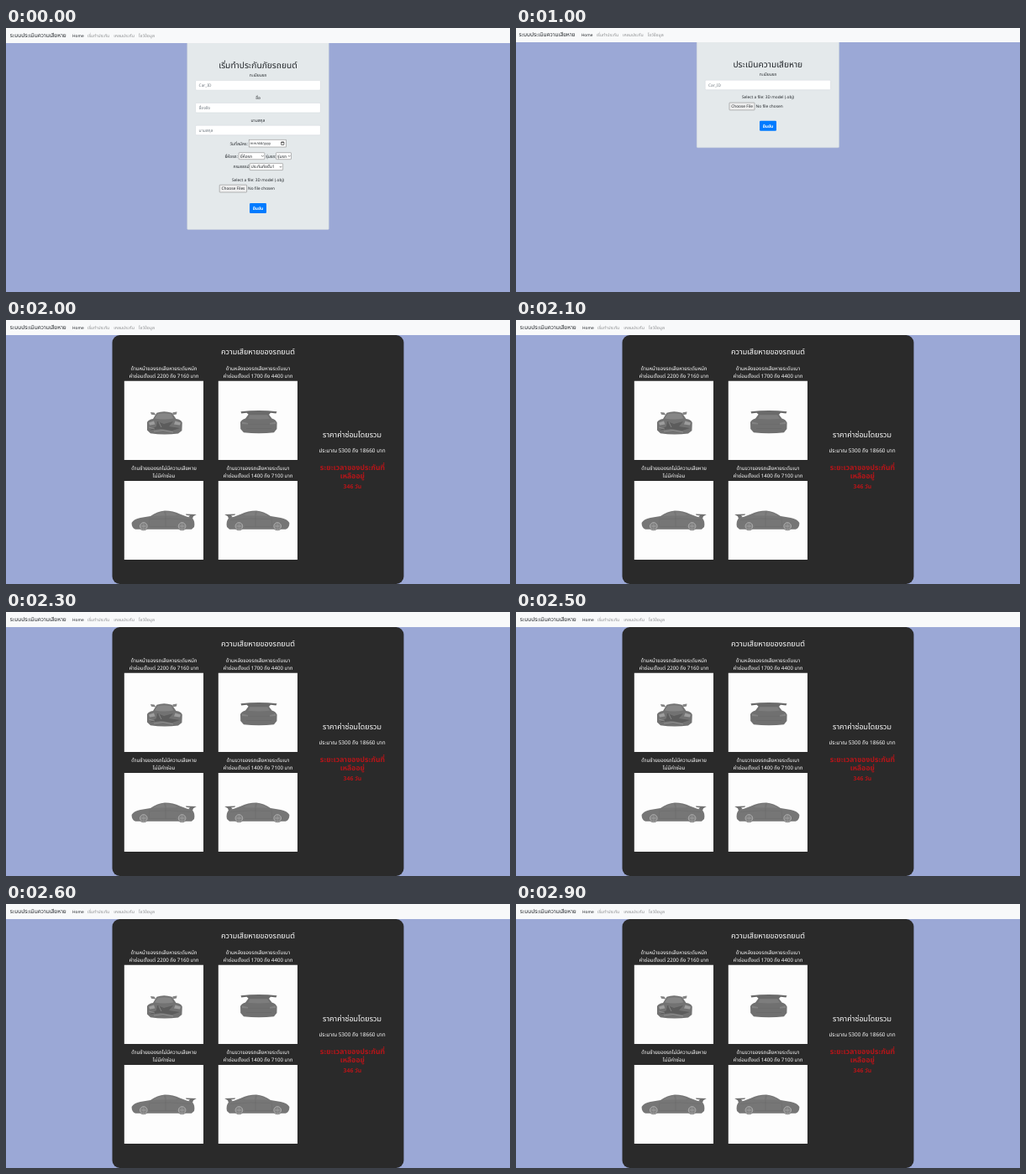
Recreate the animation shown at these times as an HTML page. Size 600 by 315 pixels, loop 3 s.

```html
<!DOCTYPE html>
<html lang="th">
<head>
<meta charset="utf-8">
<title>ระบบประเมินความเสียหาย</title>
<style>
html, body { margin: 0; width: 100%; height: 100%; overflow: hidden; background: #9ba8d6; }
svg { display: block; width: 600px; height: 315px; }
text { font: 5px "Noto Sans", "Noto Sans Thai", sans-serif; fill: #212529; text-rendering: geometricPrecision; }
.page { animation: turn 3s step-end infinite; }
.second { animation-delay: -2s; }
.third { animation-delay: -1s; }
@keyframes turn {
  0% { visibility: visible; }
  33.3333%, 100% { visibility: hidden; }
}
.mid text, text.mid { text-anchor: middle; }
.en { font-size: 4.8px; }
.brand { font-size: 6.6px; }
.faint { font-size: 5.2px; fill: #8d8f91; }
.hint { fill: #6c757d; }
.date { font-size: 4.2px; }
.h1 { font-size: 10.2px; font-weight: 500; }
.card { fill: #e4e9eb; stroke: #cdd3da; stroke-width: .4; }
.field { fill: #fff; stroke: #ced4da; stroke-width: .5; }
.box { fill: #fff; stroke: #767676; stroke-width: .5; }
.file { fill: #efefef; stroke: #767676; stroke-width: .5; }
.blue { fill: #007bff; }
.send { fill: #fff; font-weight: 600; }
.third .mid text { fill: #fff; font-size: 6.15px; font-weight: 500; }
.third .mid .h2 { font-size: 9px; font-weight: 400; }
.third .mid .total { font-size: 6.45px; }
.third .mid .red { fill: #b51519; font-size: 8.7px; font-weight: 600; }
.third .mid .days { font-size: 6.9px; }
</style>
</head>
<body>
<svg viewBox="0 0 600 315">
  <defs>
    <g id="nav">
      <rect x="-4" y="-2" width="610" height="20" fill="#f8f9fa"/>
      <text class="brand" x="4.8" y="11.4">ระบบประเมินความเสียหาย</text>
      <text class="en" x="79" y="11">Home</text>
      <text class="faint" x="97.1" y="11">เริ่มทำประกัน</text>
      <text class="faint" x="128.3" y="11">เคลมประกัน</text>
      <text class="faint" x="158" y="11">โชว์ข้อมูล</text>
    </g>
    <path id="arrow" d="M-1.2-.6 0 .6 1.2-.6" fill="none" stroke="#222" stroke-width=".6"/>
    <g id="send">
      <rect class="blue" x="290" width="20" height="12" rx="1.3"/>
      <text class="send mid" x="300" y="7.8">ยืนยัน</text>
    </g>
    <g id="wheel">
      <circle r="5.2" fill="#6c6c6c"/>
      <circle r="4.4" fill="#818181" stroke="#cfcfcf" stroke-width=".6"/>
      <path d="M0-4V4M-3.8-1.2 3.8 1.2M-3.8 1.2 3.8-1.2" stroke="#aaa" stroke-width=".4"/>
    </g>
    <g id="side">
      <path d="M149.6 242Q152 237.6 160 236L172 234Q180 228.4 189 227.5Q199 227.6 207 231.5L215 234.6 222 236.5Q225.5 241 224 247L221 249.8H154Q149.5 248 149.6 242Z" fill="#767676"/>
      <path d="M214 231.4 226.8 232 223 234.2 222 237 217 235.2 219 233.4 214.5 232.8Z" fill="#707070"/>
      <path d="M175 233.8Q181 229.6 188 228.8L189 233.6ZM190.5 228.8Q198 229 204 232.7L201 233.5 191 233.6Z" fill="#7f7f7f"/>
      <path d="M171 235.5 170 246.5H203M190 234V247M172 237.5Q195 236 220 238.5" fill="none" stroke="#696969" stroke-width=".4"/>
      <use href="#wheel" x="163.8" y="246"/>
      <use href="#wheel" x="209.6" y="246"/>
    </g>
  </defs>

  <g class="page">
    <rect width="600" height="315" fill="#9ba8d6"/>
    <rect class="card" x="215.7" y="16" width="168.6" height="224.5" rx="1.3"/>
    <use href="#nav"/>
    <g class="mid">
      <text class="h1" x="300" y="48.2">เริ่มทำประกันภัยรถยนต์</text>
      <text x="300" y="57.8">ทะเบียนรถ</text>
      <text x="300" y="85">ชื่อ</text>
      <text x="300" y="111.8">นามสกุล</text>
      <text class="en" x="300" y="182.6">Select a file: 3D model (.obj)</text>
    </g>
    <rect class="field" x="225.6" y="62.6" width="148.8" height="11.6" rx="1.2"/>
    <rect class="field" x="225.6" y="89.4" width="148.8" height="11.6" rx="1.2"/>
    <rect class="field" x="225.6" y="116.2" width="148.8" height="11.6" rx="1.2"/>
    <text class="hint en" x="229.6" y="70.2">Car_ID</text>
    <text class="hint" x="229.6" y="97">ชื่อจริง</text>
    <text class="hint" x="229.6" y="123.8">นามสกุล</text>

    <text x="266.4" y="139.5">วันที่สมัคร:</text>
    <rect class="box" x="289.2" y="133.2" width="44.4" height="8.8"/>
    <text class="date" x="290.6" y="139.2">mm/dd/yyyy</text>
    <path d="M327.7 136h3.2v3.3h-3.2zM327.7 136.4h3.2" fill="none" stroke="#111" stroke-width=".6"/>

    <text x="260.4" y="154.6">ยี่ห้อรถ:</text>
    <rect class="box" x="277.2" y="148.7" width="30.6" height="8" rx=".6"/>
    <text x="278.8" y="154.5">ยี่ห้อรถ</text>
    <use href="#arrow" x="305.4" y="152.8"/>
    <text x="309.2" y="154.6">รุ่นรถ:</text>
    <rect class="box" x="321.5" y="148.7" width="18" height="8" rx=".6"/>
    <text x="323" y="154.5">รุ่นรถ</text>
    <use href="#arrow" x="337.2" y="152.8"/>

    <text x="270.4" y="167.4">กรมธรรม์</text>
    <rect class="box" x="290.2" y="161.6" width="39.4" height="8" rx=".6"/>
    <text x="291.8" y="167.3">ประกันภัยชั้น1</text>
    <use href="#arrow" x="327" y="165.7"/>

    <rect class="file" x="254.2" y="187.2" width="32.4" height="8.8" rx=".6"/>
    <text class="en" x="256.4" y="193.4">Choose Files</text>
    <text class="en" x="288" y="193.4">No file chosen</text>
    <use href="#send" y="209"/>
  </g>

  <g class="page second">
    <rect width="600" height="315" fill="#9ba8d6"/>
    <rect class="card" x="215.2" y="15" width="169.4" height="127.8" rx="1.3"/>
    <use href="#nav" x="-1.2" y="-1"/>
    <g class="mid">
      <text class="h1" x="299.8" y="47.2">ประเมินความเสียหาย</text>
      <text x="300" y="57.4">ทะเบียนรถ</text>
      <text class="en" x="300" y="84.2">Select a file: 3D model (.obj)</text>
    </g>
    <rect class="field" x="225.2" y="62.2" width="149.4" height="11.6" rx="1.2"/>
    <text class="hint en" x="229" y="69.8">Car_ID</text>
    <rect class="file" x="254" y="89.1" width="30" height="8.8" rx=".6"/>
    <text class="en" x="256.2" y="95.3">Choose File</text>
    <text class="en" x="285.6" y="95.3">No file chosen</text>
    <use href="#send" y="110.8"/>
  </g>

  <g class="page third">
    <rect width="600" height="315" fill="#9ba8d6"/>
    <use href="#nav"/>
    <rect x="126.5" y="18" width="347" height="297" rx="9" fill="#2a2a2a"/>
    <path d="M140.8 72.8h94.2v94.2h-94.2zM252.8 72.8h94.2v94.2h-94.2zM140.8 191.9h94.2v94.2h-94.2zM252.8 191.9h94.2v94.2h-94.2z" fill="#fdfdfd"/>
    <g class="mid">
      <text class="h2" x="300" y="41">ความเสียหายของรถยนต์</text>
      <text x="188" y="59.6">ด้านหน้าของรถเสียหายระดับหนัก</text>
      <text x="188" y="69.4">ค่าซ่อมตั้งแต่ 2200 ถึง 7160 บาท</text>
      <text x="300" y="59.6">ด้านหลังของรถเสียหายระดับเบา</text>
      <text x="300" y="69.4">ค่าซ่อมตั้งแต่ 1700 ถึง 4400 บาท</text>
      <text x="188" y="178.6">ด้านซ้ายของรถไม่มีความเสียหาย</text>
      <text x="188" y="188.4">ไม่มีค่าซ่อม</text>
      <text x="300" y="178.6">ด้านขวาของรถเสียหายระดับเบา</text>
      <text x="300" y="188.4">ค่าซ่อมตั้งแต่ 1400 ถึง 7100 บาท</text>
      <text class="h2" x="412" y="139.8">ราคาค่าซ่อมโดยรวม</text>
      <text class="total" x="412" y="158.4">ประมาณ 5300 ถึง 18660 บาท</text>
      <text class="red" x="412.4" y="178.8">ระยะเวลาของประกันที่</text>
      <text class="red" x="412.4" y="188.8">เหลืออยู่</text>
      <text class="red days" x="412.4" y="201">346 วัน</text>
    </g>

    <g>
      <path d="M168 122Q169.5 118.8 175 118L179.5 110.8Q188 107.6 197.5 110.8L202.5 118Q208.5 118.8 209.8 122.5L209.4 132 205 135.4Q188 137.8 172 135.2L168 131.5Z" fill="#727272"/>
      <path d="M172 110 176.5 110.4 178.5 113.5 173 112.8ZM203.5 109.6 198.5 110.2 198 113.5 203 112.6Z" fill="#848484"/>
      <path d="M180.5 112Q188 110.4 196.5 112L199.5 117.5Q188 119.5 177 117.5Z" fill="#868686"/>
      <path d="M170 122.5 176 120.5 177.5 124.5 171 125.5ZM208 122.5 201.5 120.5 200 124.5 207 125.5Z" fill="#9d9d9d"/>
      <path d="M180 121 188 124 199 121 194 127 207 129 198 132 184 130 171 131.5 179 127Z" fill="#5c5c5c"/>
      <path d="M176 133 187 131.5 199 134M182 122 185 128M170 128 177 130" fill="none" stroke="#a5a5a5" stroke-width=".6"/>
    </g>
    <g>
      <path d="M279 122Q280.5 118.5 285 117.5L289.5 111.5Q301 108.4 312 111.5L316.5 117.5Q321 118.5 322.6 122.5L322.4 130 319 134.2Q301 136.4 283 134.2L279.2 130Z" fill="#707070"/>
      <path d="M279.5 109.2Q301 107 322.5 109.2L321.5 111.6 315 110.8 313 113H289L286.5 110.8 280.2 111.6Z" fill="#6a6a6a"/>
      <path d="M290.5 113.2H311L314 117.8Q301 119 288 117.8Z" fill="#7d7d7d"/>
      <path d="M281 121.5 288 123V124.6L281 124ZM321 121.5 314 123V124.6L321 124Z" fill="#828282"/>
      <path d="M288 124.3H314M286 129.5H316" fill="none" stroke="#646464" stroke-width=".5"/>
    </g>
    <use href="#side"/>
    <use href="#side" transform="translate(487 0) scale(-1 1)"/>
  </g>
</svg>
</body>
</html>
```
